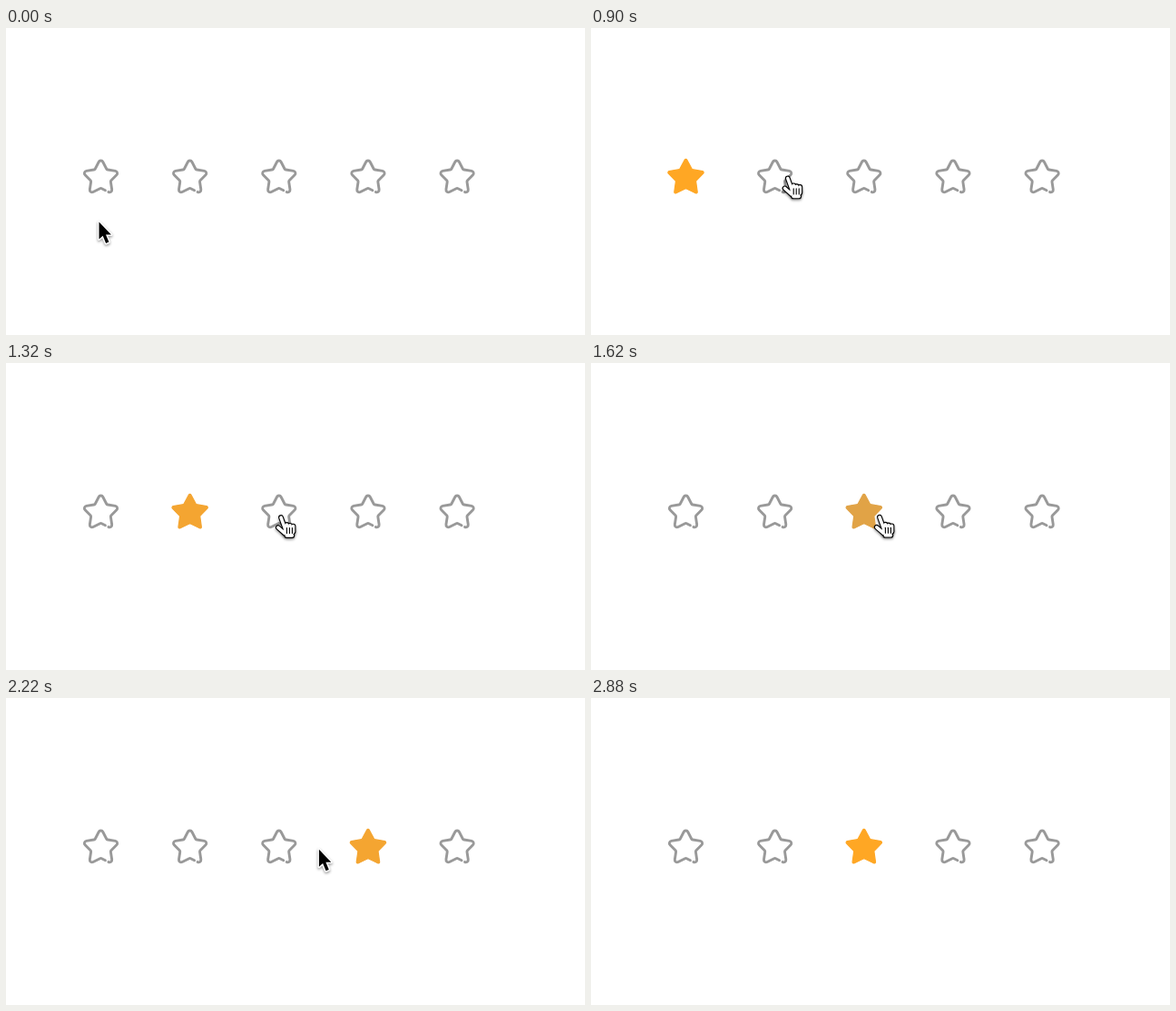
These frames come from a looping animation (638x338 px, 3.18 s). An HTML page with a canvas:

```html
<!DOCTYPE html>
<html lang="en">
<head>
<meta charset="utf-8">
<title>Star rating</title>
<style>
  html, body { margin: 0; width: 100%; height: 100%; overflow: hidden; background: #fff; }
  canvas { display: block; }
</style>
</head>
<body>
<canvas id="stage" width="638" height="338"></canvas>
<script>
const ctx = document.getElementById('stage').getContext('2d');
const WIDTH = 638, HEIGHT = 338;
const LOOP = 3180, STEP = 60, FADE = 300, EXIT = 2880;
const STARS = 5, STAR_Y = 165, HALF = 20;
const GRAY = [153, 153, 153], ORANGE = [255, 167, 36];

const starX = i => 104.5 + 98.15 * i;
const mix = (a, b, k) => a + (b - a) * k;
const clamp = k => Math.min(1, Math.max(0, k));
const smooth = k => k * k * (3 - 2 * k);
const easeOut = k => 1 - (1 - k) ** 2.4;

const clicks = [
  { at: 600, star: 0 }, { at: 1140, star: 1 }, { at: 1500, star: 2 },
  { at: 2040, star: 3 }, { at: 2520, star: 2 }
];

// Eased pointer moves: start time, end time, x, y
const home = [102.5, 213.5];
const moves = [
  [300, 600, 101, 161.5],
  [690, 930, 222, 164],
  [930, 1140, 203, 167],
  [1150, 1270, 315, 171],
  [1270, 1320, 303, 168.5],
  [1560, 1800, 399, 166.5],
  [2080, 2340, 302, 167],
  [2520, EXIT, 153, 346]
];

function pointerAt(t) {
  return moves.reduce(([px, py], [from, to, x, y]) => {
    const k = smooth(clamp((t - from) / (to - from)));
    return [mix(px, x, k), mix(py, y, k)];
  }, home);
}

// Corners run counter-clockwise from the bottom right tip to the bottom notch.
function corners(outer, inner) {
  return Array.from({ length: 10 }, (_, i) => {
    const a = (54 - 36 * i) * Math.PI / 180, r = i % 2 ? inner : outer;
    return [Math.cos(a) * r, Math.sin(a) * r];
  });
}

// An open path; from and to are positions on the edge between notch and tip.
function starPath(points, from, to, tipRadius, notchRadius) {
  const path = new Path2D(), tip = points[0], notch = points[9];
  const along = k => [mix(notch[0], tip[0], k), mix(notch[1], tip[1], k)];
  const end = along(to);
  path.moveTo(...along(from));
  points.forEach((p, i) => {
    path.arcTo(...p, ...(points[i + 1] || end), i % 2 ? notchRadius : tipRadius);
  });
  path.lineTo(...end);
  return path;
}

const outline = starPath(corners(22, 11.3), .7, .38, 2.6, 2);
const solid = starPath(corners(22.3, 11.6), .5, .5, 1.5, .5);

function drawStar(x, age) {
  const filled = age !== null;
  const k = filled ? easeOut(clamp(age / FADE)) : 0;
  const color = `rgb(${GRAY.map((c, i) => Math.round(mix(c, ORANGE[i], k)))})`;
  ctx.save();
  ctx.translate(x, STAR_Y);
  ctx.fillStyle = ctx.strokeStyle = color;
  ctx.lineCap = ctx.lineJoin = 'round';
  ctx.lineWidth = filled ? 1.2 : 2.9;
  if (filled) ctx.fill(solid);
  ctx.stroke(filled ? solid : outline);
  ctx.restore();
}

function line(x0, y0, x1, y1, width) {
  ctx.lineWidth = width;
  ctx.beginPath();
  ctx.moveTo(x0, y0);
  ctx.lineTo(x1, y1);
  ctx.stroke();
}

function shadow(on) {
  ctx.shadowColor = on ? 'rgba(0,0,0,.4)' : 'transparent';
  ctx.shadowBlur = 3;
  ctx.shadowOffsetY = 1.5;
}

// Overlapping capsules, grown by the given margin.
function handShape(margin) {
  const limb = (x0, y0, x1, y1, width) => line(x0, y0, x1, y1, width + 2 * margin);
  limb(0, 1.6, 4.5, 14, 3.6);
  limb(-3.2, 12.6, 4, 19, 3.6);
  for (let i = 0; i < 3; i++) limb(6.4 + 3.5 * i, 9.6 + .8 * i, 6.4 + 3.5 * i, 17, 3.8);
  limb(7.5, 16.5, 10, 16.5, 10);
  limb(6.3, 21.5, 12.3, 21.5, 3.6);
}

function drawHand() {
  ctx.lineCap = 'round';
  ctx.strokeStyle = '#000';
  shadow(true);
  handShape(1.1);
  shadow(false);
  ctx.strokeStyle = '#fff';
  handShape(0);
  ctx.strokeStyle = '#000';
  for (let x = 6.4; x < 13; x += 3) line(x, 13, x, 19, 1.1);
}

const arrow = new Path2D('M0 0V19L4.2 15.2L7.6 23.5L10.9 22.1L7.5 13.9H13.4Z');

function drawArrow() {
  ctx.lineJoin = 'round';
  ctx.lineWidth = 3;
  ctx.strokeStyle = '#fff';
  shadow(true);
  ctx.stroke(arrow);
  shadow(false);
  ctx.fillStyle = '#000';
  ctx.fill(arrow);
}

function drawPointer(x, y) {
  const column = Math.round((x - starX(0)) / (starX(1) - starX(0)));
  const overStar = Math.abs(x - starX(column)) < HALF && Math.abs(y - STAR_Y) < HALF;
  ctx.save();
  ctx.translate(x, y);
  if (overStar) drawHand(); else drawArrow();
  ctx.restore();
}

function draw(now) {
  const t = Math.floor(now % LOOP / STEP) * STEP;
  const click = clicks.filter(c => c.at <= t).pop();
  ctx.fillStyle = '#fff';
  ctx.fillRect(0, 0, WIDTH, HEIGHT);
  for (let i = 0; i < STARS; i++) {
    drawStar(starX(i), click && click.star === i ? t - click.at : null);
  }
  if (t < EXIT) drawPointer(...pointerAt(t));
}

const start = performance.now();
function tick() {
  draw(performance.now() - start);
  requestAnimationFrame(tick);
}
tick();
</script>
</body>
</html>
```
